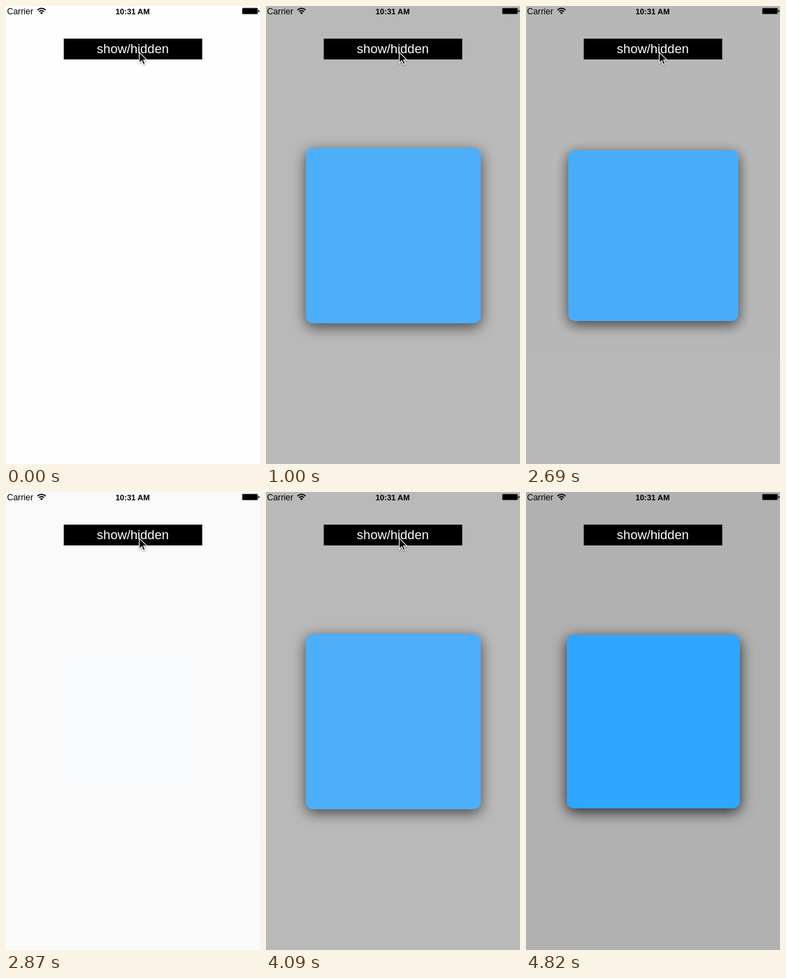
These frames come from a looping animation (367 by 660 pixels, 6.12 s). An HTML page:

```html
<!DOCTYPE html>
<html lang="en">
<head>
<meta charset="utf-8">
<title>Show and hide a panel</title>
<style>
  html, body { margin: 0; width: 100%; height: 100%; overflow: hidden; background: #fefefe; }
  #dim { position: absolute; inset: 0; background: #b1b1b1; opacity: 0; }
  #panel {
    position: absolute; left: 58.5px; top: 205.5px; width: 250px; height: 250px;
    border-radius: 10px; background: #2fa6ff; box-shadow: 0 5px 20px rgba(0, 0, 0, .8);
  }
  svg { position: absolute; left: 0; top: 0; }
  text { font-family: "Liberation Sans", Arial, sans-serif; }
  #cursor { filter: drop-shadow(0 1px 1px rgba(0, 0, 0, .4)); }
</style>
</head>
<body>
<div id="dim"><div id="panel"></div></div>
<svg width="367" height="660" viewBox="0 0 367 660">
  <text x="1.5" y="12" font-size="12.4">Carrier</text>
  <g fill="none" stroke="#000" stroke-width="1.7">
    <path d="M45.4 5.9a8.3 8.3 0 0 1 11.8 0"/>
    <path d="M47.7 8.2a5.1 5.1 0 0 1 7.2 0"/>
  </g>
  <path d="M51.3 12l-2.1-2.2a3 3 0 0 1 4.2 0z"/>
  <text x="183" y="12" font-size="11.4" font-weight="bold" text-anchor="middle">10:31 AM</text>
  <rect x="341" y="2.5" width="23" height="9.5" rx="1.5" fill="#777"/>
  <rect x="341.7" y="3.2" width="21.6" height="8.1" rx="1"/>
  <path d="M364.5 5.4q1.8.3 1.8 1.9t-1.8 1.9z"/>
  <rect x="83.5" y="47" width="200" height="30"/>
  <text x="183.3" y="68.3" font-size="18.5" fill="#fff" text-anchor="middle">show/hidden</text>
  <g id="cursor">
    <path d="M.5.5v15.6l3.6-3.4 2.4 5.6 2.6-1.1-2.4-5.5h4.9z" stroke="#fff" stroke-width="1.1"/>
  </g>
</svg>
<script>
  const LOOP = 6120;
  const dim = document.getElementById('dim');
  const panel = document.getElementById('panel');
  const cursor = document.getElementById('cursor');

  const step = (t, size) => Math.floor(t / size) * size;

  // Fast ease-out that shrinks the panel from slightly oversized.
  function appear(t) {
    const alpha = 1 - Math.exp(-(Math.min(step(t, 57), 456) + 50) / 75);
    return { alpha, scale: 1 + .095 * (1 - alpha) };
  }

  // Linear fade that shrinks the panel further and leaves a faint tint.
  function vanish(t) {
    const alpha = .91 - .29 * Math.min(step(t, 60), 180) / 60;
    return { alpha, scale: 1 - .18 * (1 - alpha) };
  }

  function panelState(t) {
    if (t < 890) return { alpha: 0, scale: 1 };
    if (t < 2690) return appear(t - 883);
    if (t < 3970) return vanish(t - 2690);
    return appear(t - 3970);
  }

  function cursorPosition(t) {
    if (t < 4700) return [192, 66];
    if (t < 4760) return [250, 60];
    return [356, 46];
  }

  function draw(t) {
    const { alpha, scale } = panelState(t);
    dim.style.opacity = alpha;
    panel.style.opacity = alpha ** .58;
    panel.style.transform = `scale(${scale})`;
    cursor.setAttribute('transform', `translate(${cursorPosition(t)})`);
    cursor.style.visibility = t < 4820 ? 'visible' : 'hidden';
  }

  const start = performance.now();
  function tick() {
    draw((performance.now() - start) % LOOP);
    requestAnimationFrame(tick);
  }
  tick();
</script>
</body>
</html>
```
